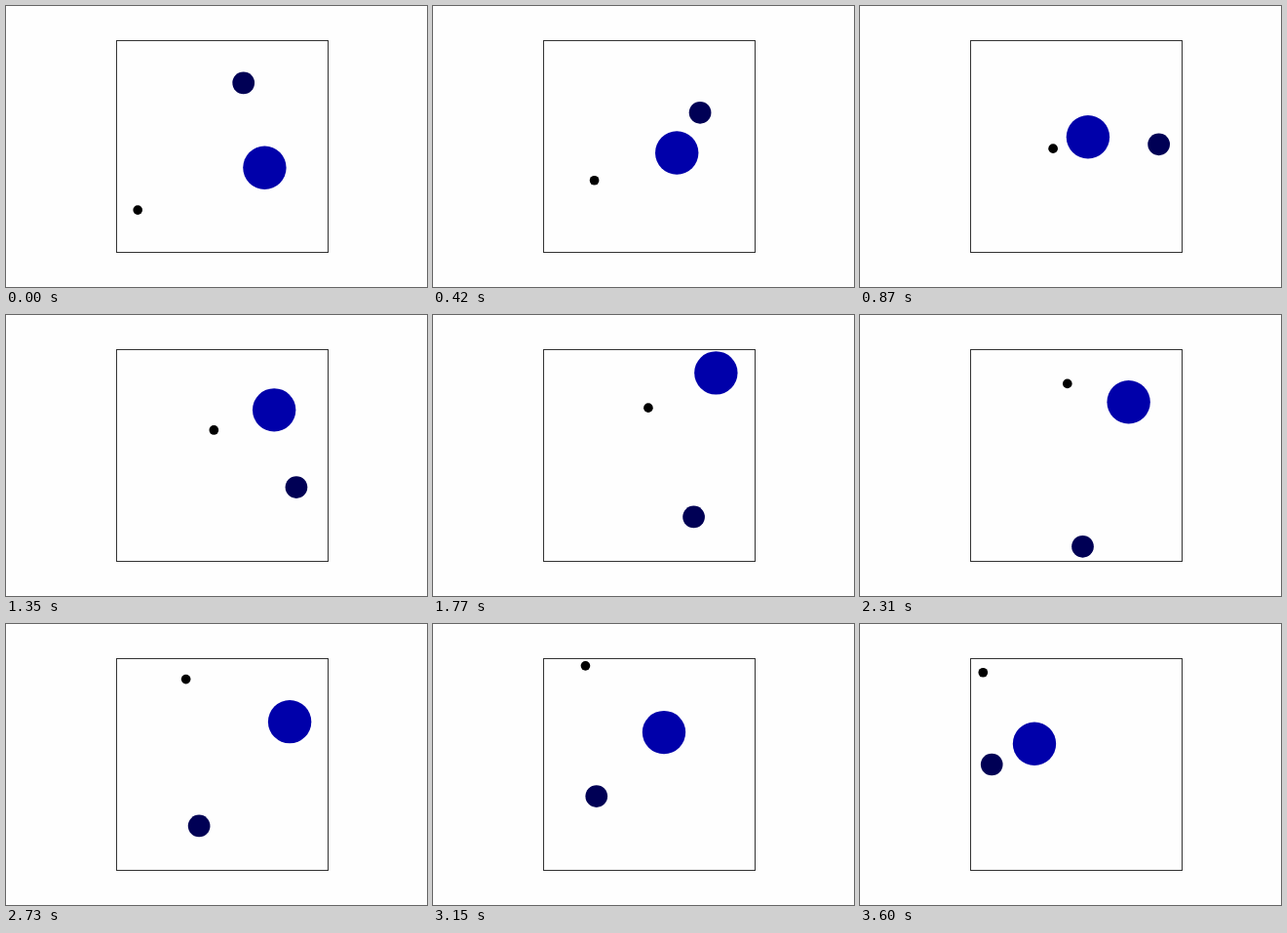
Write an HTML page that moves like this. It is 432x288 px and loops after 3.63 s.

```html
<!DOCTYPE html>
<html lang="en">
<head>
<meta charset="utf-8">
<title>Balls in a box</title>
<style>
html, body { margin: 0; width: 100%; height: 100%; overflow: hidden; background: #fefefe; }
svg { display: block; }
</style>
</head>
<body>
<svg width="432" height="288" viewBox="0 0 432 288">
  <clipPath id="box"><rect x="113.5" y="35.5" width="217" height="217"/></clipPath>
  <g id="balls" clip-path="url(#box)"></g>
  <rect x="113.5" y="35.5" width="217" height="217" fill="none" stroke="#333"/>
</svg>
<script>
const STEP = 30, COUNT = 121, DT = 0.01;
const LEFT = 113.5, BOTTOM = 252.5, SIZE = 217;

const balls = [
  { x: 0.1, y: 0.2, vx: 1, vy: 1, r: 0.02, m: 3 },
  { x: 0.6, y: 0.8, vx: 1, vy: -1, r: 0.05, m: 2 },
  { x: 0.7, y: 0.4, vx: -0.5, vy: 0.5, r: 0.1, m: 1 }
];

// On contact the pair separates along the line of centres at its old relative speed.
function collide(a, b) {
  const dx = a.x - b.x, dy = a.y - b.y, d = Math.hypot(dx, dy);
  if (d >= a.r + b.r) return;
  const speed = Math.hypot(a.vx - b.vx, a.vy - b.vy);
  const m = a.m + b.m;
  const cx = (a.m * a.vx + b.m * b.vx) / m;
  const cy = (a.m * a.vy + b.m * b.vy) / m;
  const ux = speed * dx / d, uy = speed * dy / d;
  a.vx = cx + ux * b.m / m;
  a.vy = cy + uy * b.m / m;
  b.vx = cx - ux * a.m / m;
  b.vy = cy - uy * a.m / m;
}

function bounce(p, v, r) {
  const eps = 1e-9;
  if (p <= r + eps) return Math.abs(v);
  if (p >= 1 - r - eps) return -Math.abs(v);
  return v;
}

function advance() {
  for (const b of balls) {
    b.x += b.vx * DT;
    b.y += b.vy * DT;
  }
  balls.forEach((a, i) => balls.slice(i + 1).forEach(b => collide(a, b)));
  for (const b of balls) {
    b.vx = bounce(b.x, b.vx, b.r);
    b.vy = bounce(b.y, b.vy, b.r);
  }
}

const states = [];
for (let i = 0; i < COUNT; i++) {
  states.push(balls.map(b => [LEFT + b.x * SIZE, BOTTOM - b.y * SIZE]));
  advance();
}

const group = document.getElementById("balls");
const dots = balls.map(b => {
  const dot = document.createElementNS("http://www.w3.org/2000/svg", "circle");
  dot.setAttribute("r", b.r * SIZE + 0.5);
  dot.setAttribute("fill", `rgb(0,0,${85 * (3 - b.m)})`);
  return group.appendChild(dot);
});

function draw(ms) {
  const state = states[Math.floor(ms / STEP) % COUNT];
  dots.forEach((dot, i) => {
    dot.setAttribute("cx", state[i][0]);
    dot.setAttribute("cy", state[i][1]);
  });
}

const start = performance.now();
function tick() {
  draw(performance.now() - start);
  requestAnimationFrame(tick);
}
draw(0);
requestAnimationFrame(tick);
</script>
</body>
</html>
```
